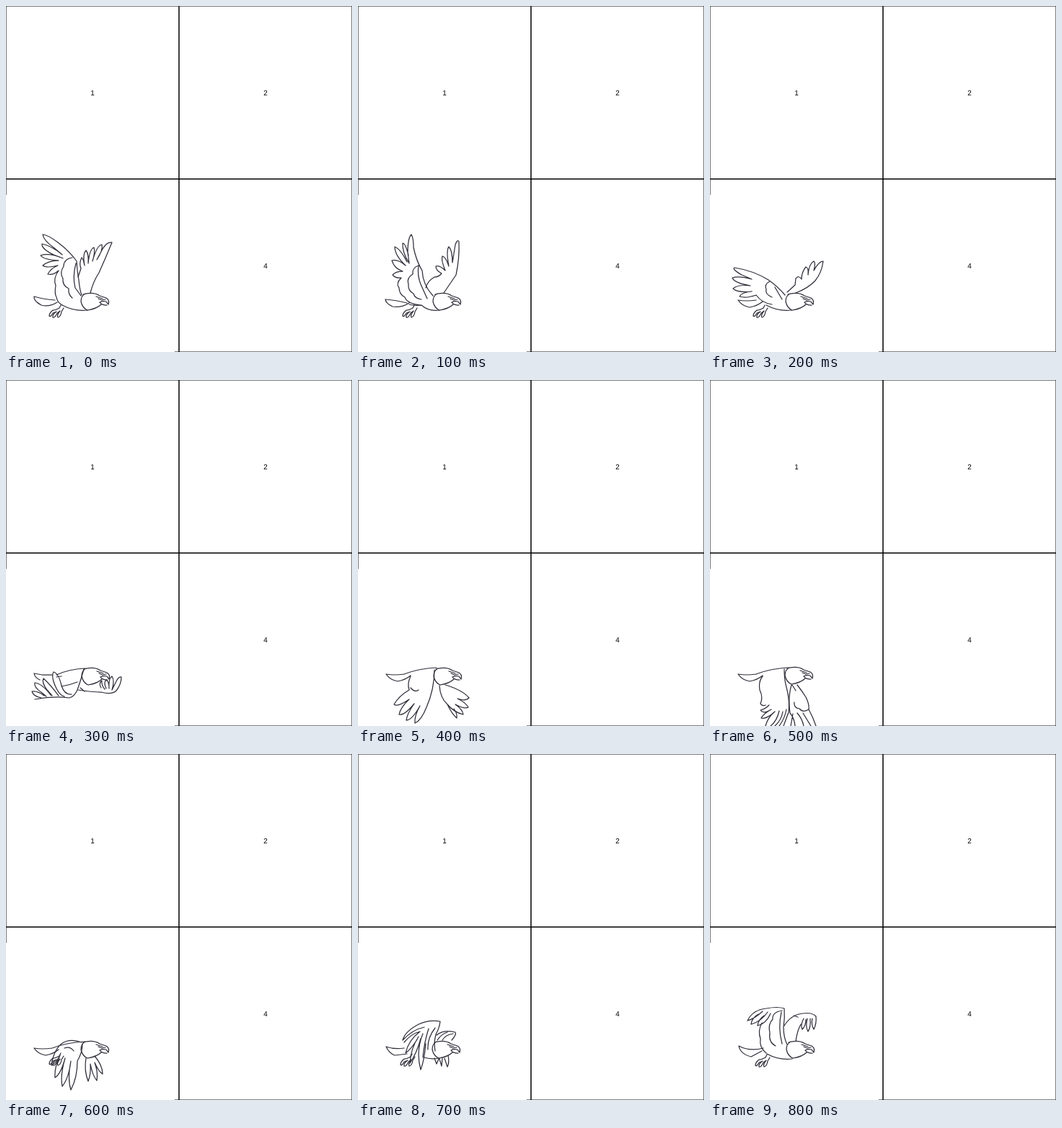
An HTML page for the animation above (0.9 s loop, 480 by 480 pixels).

```html
<!DOCTYPE html>
<html lang="en">
<head>
<meta charset="utf-8">
<title>Flying bird</title>
<style>
  html, body { margin: 0; height: 100%; overflow: hidden; background: #fff; }
  svg { display: block; width: 100vw; height: 100vh; }
  text { font: 10px "Liberation Sans", Arial, sans-serif; text-anchor: middle; text-rendering: geometricPrecision; }
  .cell { fill: none; stroke: #000; }
  #bird { fill: none; stroke: #302f3a; stroke-width: 1.25; stroke-linecap: round; stroke-linejoin: round; }
</style>
</head>
<body>
<svg viewBox="0 0 480 480">
  <rect class="cell" width="240" height="240"/>
  <rect class="cell" x="240" width="240" height="240"/>
  <rect class="cell" y="240" width="240" height="240"/>
  <rect class="cell" x="240" y="240" width="240" height="240"/>
  <rect y="262" width="234" height="218" fill="#fff"/>
  <text x="120" y="124">1</text>
  <text x="360" y="124">2</text>
  <text x="360" y="364">4</text>
  <g id="bird">
    <path id="body"/>
    <path id="near"/>
    <path id="far"/>
    <path id="feet" d="M74 419Q69 422 65 422Q60 426 60 430Q62 432 65 426L70 424Q64 428 65 432Q68 433 71 426L75 423Q70 429 72 432Q76 431 77 424L80 419M76 415L74 419"/>
    <path id="head" d="M110 399Q104 402 104 410Q106 419 113 422M107 400Q121 396 130 402L139 405Q144 408 142 414L139 410Q134 409 130 411Q133 415 140 415M113 422Q126 420 132 414M125 403L134 406M128 406L133 408L138 407"/>
  </g>
</svg>
<script>
const STEP = 100;
const part = id => document.getElementById(id);

const raisedTail = "M68 408Q52 407 39 403Q38 409 49 415Q60 418 71 411";
const levelTail = "M39 408Q50 410 64 408M39 408Q44 416 55 418Q66 416 73 410";
const belly = "M78 415Q95 424 113 422";
const back = "M64 408Q85 400 109 399";

// One entry per wing position, in flapping order.
const poses = [
  {
    body: raisedTail + belly, feet: [0, 0], head: [0, 0],
    near: `M51 317Q59 318 72 328Q88 340 98 354Q99 370 101 380Q102 393 105 401
      M51 317Q52 325 66 335L78 345Q62 332 50 330Q49 337 66 345L79 350Q60 342 48 346
      Q52 352 73 353Q59 353 51 360Q56 364 72 360Q62 364 58 372Q65 374 73 367
      Q65 378 69 388Q67 399 70 404Q71 411 78 415
      M92 349Q80 351 80 361Q74 370 79 378Q78 388 87 392Q86 400 92 405
      M97 357Q92 376 96 391L104 402`,
    far: `M117 398Q121 382 129 370Q138 350 147 328Q140 327 134 337L126 352Q135 338 133 331
      Q126 332 120 354Q124 341 122 335Q116 337 114 357Q115 344 111 339Q106 344 109 360
      Q107 350 105 349Q101 357 104 364L100 376`
  },
  {
    body: "M68 412Q52 408 38 407Q38 412 48 417Q60 419 71 412M71 414Q78 416 88 415Q98 424 113 422",
    feet: [2, 0], head: [0, 0],
    near: `M74 317Q77 321 77 335Q81 354 89 367Q90 387 104 402
      M74 317Q69 322 69 342L71 357Q61 341 62 329Q66 329 70 346
      M68 355Q59 337 51 334Q51 346 66 360Q56 351 47 353Q50 364 62 368
      Q52 368 48 373Q52 378 60 377Q52 385 57 391Q57 400 65 404Q68 413 87 415
      M84 360Q75 363 76 372Q67 377 70 386Q69 395 77 399Q79 406 88 407
      M84 360Q82 374 87 386L96 406`,
    far: `M119 398Q128 385 136 373Q141 350 140 327Q138 323 135 331L131 356
      Q131 339 126 334Q122 339 126 361Q122 348 117 347Q115 352 121 367
      Q113 359 108 361Q108 367 116 371Q112 376 106 376Q96 382 94 391`
  },
  {
    body: levelTail + belly, feet: [0, 0], head: [1, 0],
    near: `M104 401Q94 389 81 380Q60 367 34 363Q30 365 44 373L58 379Q40 374 31 377
      Q33 384 56 388Q39 386 32 392Q38 398 58 396Q44 397 41 403Q50 406 64 401
      Q72 412 86 414M83 382Q75 386 78 393Q76 400 86 404M90 390L100 407`,
    far: `M119 398Q137 391 146 381Q155 370 157 354Q151 354 144 367
      Q147 356 144 354Q137 358 136 373Q137 363 133 362Q127 369 127 379
      Q123 373 119 378L118 387L107 397`
  },
  {
    body: "M64 409H50L39 407Q40 413 47 416M70 409Q88 401 109 400M77 425Q89 423 99 419", head: [1, 1],
    near: `M108 401Q104 416 99 430Q95 439 88 441Q65 438 40 443
      M91 436Q81 437 77 424Q73 407 66 405Q62 412 70 428Q75 438 81 439
      M73 438Q61 422 52 414Q49 419 57 430L64 438M62 437Q50 421 40 420
      Q38 426 50 434L56 439M53 438Q44 431 36 432Q38 439 49 441M70 412L77 411`,
    far: `M100 430Q119 433 132 433Q147 437 153 431Q160 422 160 412Q156 411 152 420L147 430
      Q151 417 147 411Q142 414 143 428Q143 418 139 416Q135 420 139 428
      M137 429Q132 423 133 417Q128 421 132 427M103 427L109 432`
  },
  {
    body: levelTail + back, head: [1, 1],
    near: `M73 411Q68 421 71 430Q57 438 50 450Q55 454 71 443Q59 454 57 464
      Q64 466 78 449Q68 463 67 472Q75 472 86 452Q78 466 79 476
      Q88 472 95 454Q106 429 106 402M73 427Q79 434 84 430`,
    far: `M113 424Q114 441 124 450Q133 461 146 464Q145 457 135 450
      Q148 457 153 454Q149 447 138 442Q149 446 154 441Q145 430 121 423
      M124 450Q130 463 137 469Q138 463 133 456`
  },
  {
    body: levelTail + back, head: [0, 0],
    near: `M73 411Q67 418 69 430Q74 440 70 449Q73 453 77 451M82 451Q76 457 70 458
      Q74 464 85 457Q74 463 71 469Q78 471 90 460Q80 468 77 480
      M84 480Q93 473 96 459M90 480Q99 472 101 460M96 480Q104 469 106 457
      M103 401Q103 416 106 426Q111 445 109 461L102 480`,
    far: `M113 423Q108 440 111 462M121 423Q128 432 133 440Q138 450 137 457
      M117 447Q116 455 124 456Q129 462 137 457Q143 468 147 480
      M111 462Q117 469 118 480M115 463L112 480M121 462Q128 470 130 480
      M129 462L140 480M114 423L119 431`
  },
  {
    body: levelTail + back, feet: [0, 0], head: [0, 0],
    near: `M105 400Q88 394 77 402Q66 411 63 432Q69 429 75 418
      Q67 434 68 449Q76 444 82 422Q75 445 78 461Q87 450 90 426
      Q85 451 90 466Q99 449 99 426Q106 414 106 402M81 408Q89 405 94 412`,
    far: `M111 422Q108 439 114 454Q118 444 117 430Q120 446 126 453
      Q128 442 123 428Q128 440 134 444Q134 432 123 419`
  },
  {
    body: "M64 408Q50 410 39 406Q43 415 51 418L68 416M92 421Q101 424 113 422", feet: [-1, 1], head: [-1, 0],
    near: `M62 397Q65 385 84 375Q99 368 114 371Q113 380 108 389Q105 400 107 412
      M62 397Q76 382 92 379M64 400Q74 388 86 385Q70 397 66 415Q74 409 82 396
      M84 392Q73 409 72 429Q81 416 87 395M90 388Q80 412 87 438Q92 425 94 402
      M98 381Q92 399 90 421M107 380Q96 394 97 410`,
    far: `M109 390Q119 382 135 386Q137 389 130 397M132 388Q122 389 117 397
      M124 386Q116 388 110 397M106 422L109 430L112 423M113 423L116 433L117 422
      M120 422L124 434Q127 429 125 418`
  },
  {
    body: "M74 408Q55 413 40 405Q42 416 57 420L72 412M79 416Q95 425 114 423", feet: [3, 2], head: [2, 0],
    near: `M52 370Q59 355 78 353Q94 350 103 353Q104 366 102 379Q102 393 107 403
      M52 370Q62 367 73 357M67 361Q58 366 57 375Q71 371 80 358
      M75 363Q67 368 66 377Q78 374 84 360M72 373Q66 384 70 395Q68 407 78 415
      M100 356Q86 358 87 368Q80 375 83 387Q81 400 91 405M99 358Q94 380 100 402`,
    far: `M103 377Q112 362 128 360Q142 358 147 364Q148 374 144 382Q140 375 142 367
      M139 367Q140 379 136 385Q132 378 135 367M133 368Q133 377 128 382Q125 376 130 367
      M119 398Q121 384 126 375M116 363L122 365`
  }
];

let shown = -1;
function draw(now) {
  const index = Math.floor(now / STEP) % poses.length;
  if (index !== shown) {
    const { feet, head, ...paths } = poses[shown = index];
    for (const name in paths) part(name).setAttribute("d", paths[name]);
    part("head").setAttribute("transform", `translate(${head})`);
    part("feet").setAttribute("visibility", feet ? "visible" : "hidden");
    if (feet) part("feet").setAttribute("transform", `translate(${feet})`);
  }
  requestAnimationFrame(draw);
}
draw(performance.now());
</script>
</body>
</html>
```
